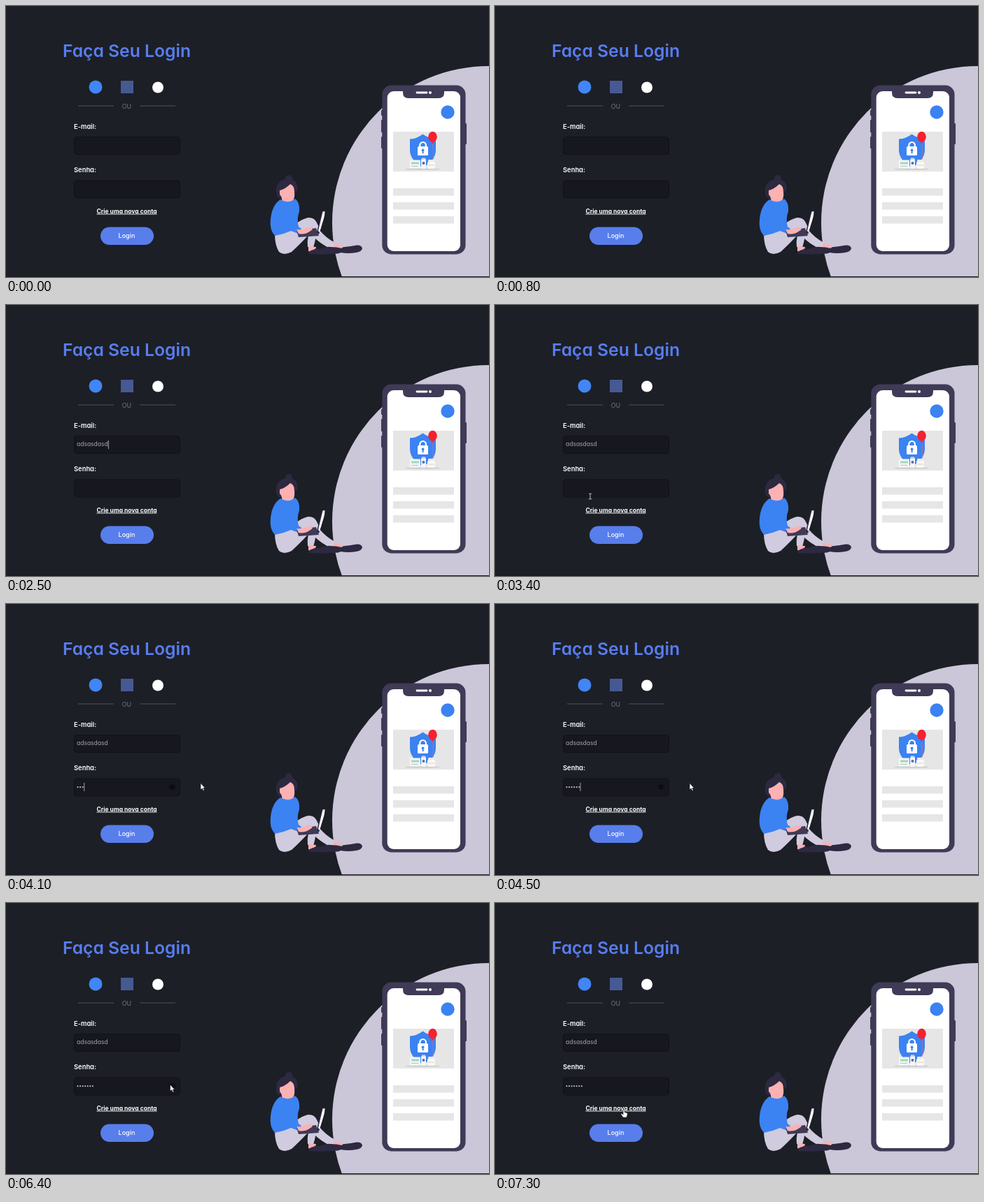
Recreate the animation shown at these times as an HTML page. Size 690x388 px, loop 8 s.

```html
<!DOCTYPE html>
<html lang="pt-BR">
<head>
<meta charset="utf-8">
<title>Login</title>
<style>
  html, body { margin: 0; width: 100%; height: 100%; overflow: hidden; background: #1c1f26; }
  svg { display: block; width: 690px; height: 388px; }
  text { font-family: Inter, "Open Sans", sans-serif; font-feature-settings: "cv11"; fill: #fff; }
  .title { font-size: 24.7px; font-weight: 600; fill: #587df0; }
  .label { font-size: 9.4px; font-weight: 600; }
  .typed { font-size: 8.5px; fill: #a5a6ac; }
  .mid { text-anchor: middle; }
  .field { fill: #16171f; stroke: #101218; }
  .skin { fill: #fcb1b3; }
  .dark { fill: #2c2940; }
  .case { fill: #3f3a56; }
  .blue { fill: #3b82f2; }
  .bar { fill: #e6e6e6; }
  .pants { fill: #d0cbde; }
</style>
</head>
<body>
<svg viewBox="0 0 690 388">
  <rect width="690" height="388" fill="#1c1f26"/>
  <circle cx="690" cy="310" r="224" fill="#cbc6d8"/>
  <rect y="387" width="690" height="1" fill="#17191f"/>

  <!-- form -->
  <text class="title mid" x="172.5" y="72.5">Faça Seu Login</text>
  <circle cx="128" cy="116" r="9.5" fill="#4285f4"/>
  <rect x="164" y="107" width="18" height="18" fill="#475993"/>
  <circle cx="217" cy="116.5" r="8" fill="#fff"/>
  <path d="M103 143H154M191 143H242" stroke="#51535b"/>
  <text class="mid" x="172.5" y="146.5" font-size="8.8" style="fill:#74767d">OU</text>
  <text class="label" x="97" y="175.5">E-mail:</text>
  <rect class="field" x="97.5" y="187.5" width="151" height="25" rx="4"/>
  <text class="label" x="97" y="238">Senha:</text>
  <rect class="field" x="97.5" y="250" width="151" height="25" rx="4"/>
  <text class="mid" x="172.5" y="296.6" font-size="8.5" font-weight="650">Crie uma nova conta</text>
  <path d="M129.5 298H215.5" stroke="#fff" stroke-width=".9"/>
  <rect x="135" y="316.5" width="76" height="25.5" rx="12.75" fill="#587eec"/>
  <text class="mid" x="172.5" y="332.4" font-size="9" font-weight="500">Login</text>

  <!-- phone -->
  <g class="case">
    <rect x="536" y="149" width="3" height="8" rx="1"/>
    <rect x="536" y="163" width="3" height="18" rx="1"/>
    <rect x="536" y="187" width="3" height="17" rx="1"/>
    <rect x="655" y="168" width="3" height="30" rx="1"/>
    <rect x="537.3" y="113.6" width="119.2" height="241.8" rx="13"/>
  </g>
  <rect x="544.7" y="122" width="104.300" height="229" rx="9" fill="#fff"/>
  <path class="case" d="M567 121.5H626V124Q626 132 618 132H575Q567 132 567 124Z"/>
  <path d="M587 124H601" stroke="#fff" stroke-width="2.8" stroke-linecap="round"/>
  <circle cx="606" cy="124" r="2" fill="#fff"/>
  <circle class="blue" cx="631" cy="152" r="9.7"/>
  <rect class="bar" x="553" y="180" width="87" height="57"/>
  <rect class="bar" x="553" y="261" width="87" height="10.5"/>
  <rect class="bar" x="553" y="281" width="87" height="10.5"/>
  <rect class="bar" x="553" y="301" width="87" height="10.5"/>

  <!-- shield, padlock, balloon, supplies -->
  <path class="blue" d="M595.5 183.500Q604 190 614 190.500V207Q613 222 595.5 231Q578 222 577 207V190.500Q587 190 595.5 183.500Z"/>
  <path d="M591.3 202V199.300A4.300 4.300 0 0 1 599.900 199.300V202" fill="none" stroke="#fff" stroke-width="2.200"/>
  <rect x="588" y="201" width="15" height="13" rx="1.5" fill="#fff"/>
  <circle class="blue" cx="595.6" cy="206.500" r="1.900"/>
  <path class="blue" d="M595 207h1.2l.6 4h-2.400z"/>
  <path d="M609.500 195Q611 207 610 221" fill="none" stroke="#d66d74" stroke-width=".7"/>
  <ellipse cx="609.500" cy="187.300" rx="6.300" ry="7.500" fill="#f4212f"/>
  <path d="M609.500 194l-1.500 2.500h3z" fill="#f4212f"/>
  <ellipse cx="595" cy="233.500" rx="25" ry="1" fill="#c9c9c9"/>
  <rect x="577" y="220.500" width="15" height="12" rx="1" fill="#f3f6f5"/>
  <rect x="579" y="223.500" width="11" height="3" fill="#a5d8bd"/>
  <path d="M579 229.500H589" stroke="#9bbdac" stroke-width=".8"/>
  <rect x="593" y="219" width="7" height="14" rx="1" fill="#f5f5f8"/>
  <rect x="594" y="217.500" width="5" height="2.500" fill="#d5d8e2"/>
  <circle cx="596.500" cy="225" r="2" fill="#536fab"/>
  <rect x="602" y="222.500" width="11" height="10.500" rx="2" fill="#faf8f5"/>
  <rect x="603" y="220" width="9" height="3" rx="1" fill="#eceaf0"/>
  <path d="M603 228H612" stroke="#e3cfb4" stroke-width="1"/>

  <!-- woman with laptop -->
  <path class="pants" d="M438 304Q445 308 448 321Q457 332 470 339L467 349Q450 342 437 328Z"/>
  <path class="skin" d="M469 339.500L481 344L479 351L467 348Z"/>
  <path class="dark" d="M478 352Q479 344 484 345Q492 344 501 342.500Q508 342 509 347Q508 352 500 353Q489 355 478 353Z"/>
  <path class="pants" d="M384 327L402 322Q420 305 432 303Q442 303 444 312Q444 330 439 346L431 345Q430 337 432 328Q419 342 408 352Q397 358 390 352Q384 342 384 327Z"/>
  <path class="skin" d="M432 344L443 345L441 353L432 351Z"/>
  <path class="dark" d="M433 354Q433 350 439 349Q443 346 448 348Q456 344 464 345Q473 345 480 347Q482 353 474 354.500Q451 356 433 355Z"/>
  <path class="dark" d="M386 267Q385 253 396 249Q399 248 399 247A5 5 0 0 1 409 247Q409 249 413 251Q418 256 416 264L411 270L394 276Q386 275 386 267Z"/>
  <path class="skin" d="M391 264Q399 262 406 255Q412 257 412 266Q413 274 410 279Q403 285 394 279Q395 274 391 270Z"/>
  <path class="blue" d="M392 277Q403 284 413 276Q420 281 419 294Q415 305 418 316L422 319L418 326L407 322Q396 327 384 329Q376 320 378 305Q380 285 392 277Z"/>
  <path class="case" d="M415 321L443 318L447 329L418 331Z"/>
  <path class="dark" d="M444 324L451 294L455 293Q456 297 455 301L447 327Z"/>
  <path d="M446 322L452.500 294.500L455.500 294Q455.500 299 454 304L448 324Z" fill="#fff"/>
  <path class="skin" d="M415 320Q424 321 430 317L437 317Q439 320 435 322Q427 328 418 326Z"/>

  <!-- live parts -->
  <text class="typed" id="mail" x="101" y="202.400"></text>
  <g id="dots" fill="#b3b4ba"></g>
  <g id="eye" fill="none" stroke="#05060a">
    <path d="M232.500 262Q237.500 255.500 242.500 262Q237.500 268 232.500 262Z"/>
    <circle cx="237.500" cy="262" r="1.400" fill="#05060a"/>
  </g>
  <rect id="caret" width=".8" height="12" fill="#c6c7cc"/>
  <g id="arrow"><path d="M0 0V9.500L2.200 7.600L3.800 11L5.300 10.300L3.800 7H6.500Z" fill="#fff" stroke="#111" stroke-width=".6"/></g>
  <g id="beam"><path d="M-2 -4Q0 -4 0 -3Q0 -4 2 -4M0 -3V3M-2 4Q0 4 0 3Q0 4 2 4" fill="none" stroke="#d5d5d8" stroke-width=".9"/></g>
  <g id="hand"><path d="M-1.500 -5Q0 -6 .7 -4.500V-1.500L4 -.5Q5 0 4.700 2L3.500 6H-1.500L-4.500 1.500Q-4.500 0 -3 .5L-1.500 2Z" fill="#fff" stroke="#111" stroke-width=".6"/></g>
</svg>
<script>
const LOOP = 8000, STEP = 100;
const WORD = "adsasdasd";
const mailKeys = [1600, 1800, 2000, 2100, 2200, 2300, 2350, 2400, 2500];
const passKeys = [3800, 3900, 4000, 4200, 4300, 4400, 4700];

// time, x, y, pointer shape from that time on
const path = [
  [1000, 215, 232, "beam"],
  [1200, 176, 203, "beam"],
  [1500, 176, 203, "arrow"],
  [1700, 182.500, 213, "arrow"],
  [2200, 182.500, 213, ""],
  [3000, 142, 284, "arrow"],
  [3200, 136, 274, "beam"],
  [3800, 136, 274, "arrow"],
  [4100, 278, 256.500, "arrow"],
  [4700, 278, 256.500, "arrow"],
  [5100, 233, 261, "beam"],
  [5300, 234.500, 260, "arrow"],
  [6400, 234.500, 260, "arrow"],
  [6700, 184, 297, "arrow"],
  [7000, 184.500, 301, "hand"],
  [LOOP, 184.500, 301, "hand"]
];

const $ = id => document.getElementById(id);
const show = (el, on) => { el.style.display = on ? "" : "none"; };
const count = (keys, t) => keys.filter(k => k <= t).length;
const within = (t, a, b) => t >= a && t < b;

const mail = $("mail"), caret = $("caret");
const dots = passKeys.map((_, i) => {
  const dot = document.createElementNS("http://www.w3.org/2000/svg", "circle");
  dot.setAttribute("cx", 102.5 + i * 3.55);
  dot.setAttribute("cy", 262.2);
  dot.setAttribute("r", 1.1);
  return $("dots").appendChild(dot);
});

function movePointer(t) {
  const next = path.findIndex(p => p[0] > t);
  const a = path[next - 1], b = path[next];
  for (const id of ["arrow", "beam", "hand"]) show($(id), a && a[3] === id);
  if (!a || !a[3]) return;
  const u = (t - a[0]) / (b[0] - a[0]), e = u * u * (3 - 2 * u);
  const mix = i => a[i] + (b[i] - a[i]) * e;
  $(a[3]).setAttribute("transform", `translate(${mix(1)} ${mix(2)})`);
}

function moveCaret(t, typed) {
  const inMail = within(t, 1300, 2700), inPass = within(t, 3600, 5000);
  show(caret, inMail || inPass);
  const x = inPass ? 101.2 + typed * 3.4 : 101.2 + mail.getComputedTextLength();
  caret.setAttribute("x", x);
  caret.setAttribute("y", inPass ? 256 : 194);
}

function draw(t) {
  const typed = count(passKeys, t);
  mail.textContent = WORD.slice(0, count(mailKeys, t));
  dots.forEach((dot, i) => show(dot, i < typed));
  show($("eye"), within(t, passKeys[0], 7300));
  moveCaret(t, typed);
  movePointer(t);
}

const start = performance.now();
function tick(now) {
  const t = Math.max(0, now - start) % LOOP;
  draw(Math.floor(t / STEP) * STEP);
  requestAnimationFrame(tick);
}
draw(0);
requestAnimationFrame(tick);
</script>
</body>
</html>
```
